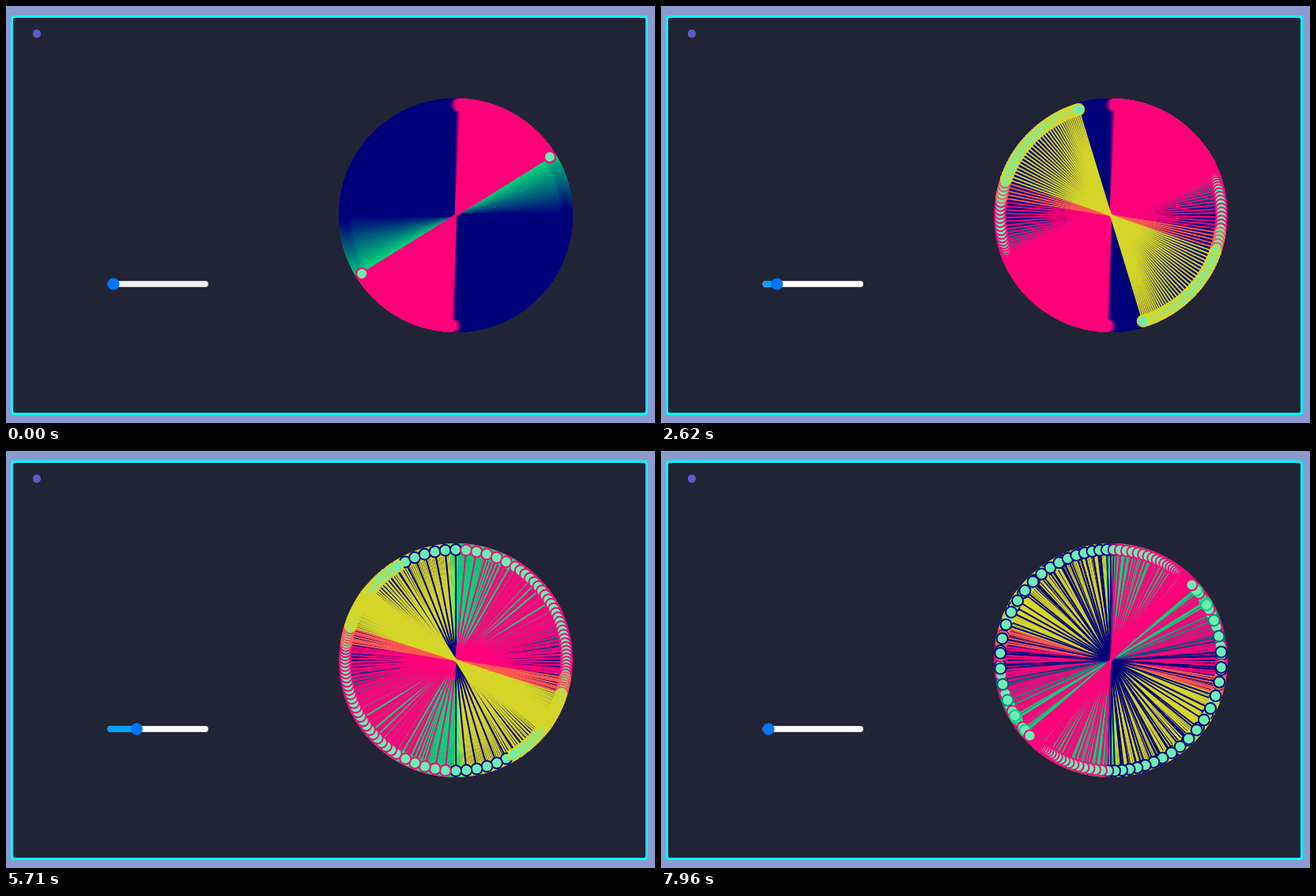
Write an HTML page with a canvas that moves like this. It is 821 px wide and 528 px high and loops after 8000 ms.

```html
<!DOCTYPE html>
<html lang="en">
<head>
<meta charset="utf-8">
<title>Spinning line</title>
<style>
  html, body { margin: 0; width: 100%; height: 100%; overflow: hidden; background: #899bd0; }
  canvas { display: block; }
</style>
</head>
<body>
<canvas id="stage" width="821" height="528"></canvas>
<script>
const LOOP = 8000, STEPS_PER_MS = 0.06;
const CENTER = { x: 569, y: 265 }, RADIUS = 140;
const START_ANGLE = -31.9, IDLE = 0.107, FAST = 5.43, TOP = 9.93;
const PANEL = '#212436';
const DRAG_START = 1640;

// Where the slider is dragged to: [ms, degrees per step], straight lines between
const drags = [
  [DRAG_START, IDLE], [1850, 2.1], [2300, 1.95], [2500, 1.1], [3130, 0.9],
  [3510, FAST], [3900, FAST], [3901, 3.3], [4370, 1.43], [4900, IDLE],
  [5475, IDLE], [5710, 2.7], [6290, TOP], [6633, TOP], [6970, 3.9], [7405, IDLE]
];

const GREEN = [0, 214, 124], NAVY = [0, 0, 123], PINK = [255, 0, 123];
const ORANGE = [255, 88, 82], YELLOW = [214, 214, 41], LIME = [90, 250, 90];

const ramp = (x, from, to) => Math.min(1, Math.max(0, (x - from) / (to - from)));
const mix = (a, b, k) => a + (b - a) * k;
const blend = (a, b, k) => a.map((c, i) => Math.round(mix(c, b[i], k)));

function speedAt(ms) {
  const next = Math.max(1, drags.findIndex(([at]) => at > ms));
  if (ms >= drags.at(-1)[0]) return IDLE;
  const [from, a] = drags[next - 1], [to, b] = drags[next];
  return mix(a, b, ramp(ms, from, to));
}

// First half turn fades green to navy, the second steps pink, orange, yellow
function colorAt(angle) {
  const turn = ((angle - 90) % 360 + 360) % 360;
  if (turn < 0.6 || turn > 357) return LIME;
  if (turn < 180) return blend(GREEN, NAVY, ramp(turn, 59, 90));
  if (turn < 278) return blend(NAVY, PINK, ramp(turn, 180, 183));
  return turn < 288 ? ORANGE : YELLOW;
}

const angles = [START_ANGLE];
for (let n = 1; n <= LOOP * STEPS_PER_MS; n++) {
  angles.push(angles[n - 1] + speedAt((n - 0.5) / STEPS_PER_MS));
}

const ctx = document.getElementById('stage').getContext('2d');

function disc(x, y, r, fill) {
  ctx.beginPath();
  ctx.arc(x, y, r, 0, Math.PI * 2);
  ctx.fillStyle = fill;
  ctx.fill();
}

function box(x, y, w, h, r, fill) {
  ctx.beginPath();
  ctx.roundRect(x, y, w, h, r);
  ctx.fillStyle = fill;
  ctx.fill();
}

function drawSpinner(angle) {
  const rad = angle * Math.PI / 180;
  const dx = RADIUS * Math.cos(rad), dy = RADIUS * Math.sin(rad);
  ctx.strokeStyle = `rgb(${colorAt(angle)})`;
  ctx.lineWidth = 2;
  ctx.beginPath();
  ctx.moveTo(CENTER.x - dx, CENTER.y - dy);
  ctx.lineTo(CENTER.x + dx, CENTER.y + dy);
  ctx.stroke();
  for (const side of [-1, 1]) {
    disc(CENTER.x + side * dx, CENTER.y + side * dy, 7, '#6ceeb2');
    ctx.stroke();
  }
}

function drawSlider(ms) {
  const thumb = mix(136, 248, (speedAt(ms) - IDLE) / TOP);
  const track = ms < 1100 ? '#efefef' : ms < DRAG_START ? '#e5e5e5' : '#ffffff';
  ctx.fillStyle = PANEL;
  ctx.fillRect(120, 340, 145, 24);
  box(128.5, 348, 127.5, 8, 4, track);
  if (thumb > 136.5) box(128.5, 348, thumb - 128.5, 8, 4, '#00a2ff');
  ctx.beginPath();
  ctx.roundRect(129, 348.5, 126.5, 7, 3.5);
  ctx.strokeStyle = 'rgba(118, 118, 118, 0.3)';
  ctx.lineWidth = 1;
  ctx.stroke();
  disc(thumb, 352, 7.5, '#0075ff');
}

// The trail is never cleared, so each loop begins with the slow half turn before it
function reset() {
  ctx.fillStyle = '#899bd0';
  ctx.fillRect(0, 0, 821, 528);
  box(6, 12, 806, 506, 4, '#00ffff');
  box(9, 15, 800, 500, 2, PANEL);
  disc(39, 35, 5.2, '#5b5bcb');
  for (let a = START_ANGLE - 238; a < START_ANGLE; a += IDLE) drawSpinner(a);
  drawSpinner(START_ANGLE);
}

let drawn = Infinity;

function frame() {
  const ms = performance.now() % LOOP;
  const step = Math.round(ms * STEPS_PER_MS);
  if (step < drawn) {
    reset();
    drawn = 0;
  }
  while (drawn < step) drawSpinner(angles[++drawn]);
  drawSlider(ms);
  requestAnimationFrame(frame);
}

frame();
</script>
</body>
</html>
```
